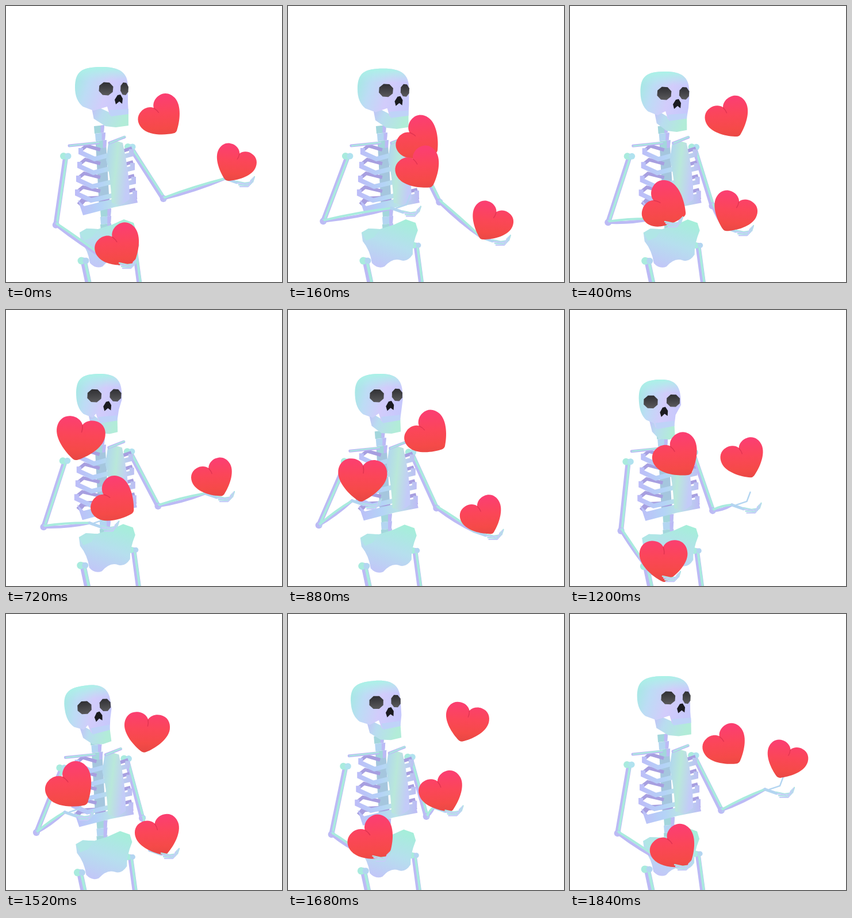
An HTML page that plays this animation: 480x480 px, repeating every 1.92 s.

```html
<!DOCTYPE html>
<html lang="en">
<head>
<meta charset="utf-8">
<title>Juggling skeleton</title>
<style>
html, body { margin: 0; width: 100%; height: 100%; overflow: hidden; background: #fff; }
svg { display: block; width: 100vw; height: 100vh; }
</style>
</head>
<body>
<svg viewBox="0 0 480 480">
  <defs>
    <linearGradient id="skull" x1="0" y1=".3" x2="1" y2=".6">
      <stop offset="0" stop-color="#a6e8e4"/><stop offset=".25" stop-color="#bddcf5"/>
      <stop offset=".6" stop-color="#d2ccfb"/><stop offset="1" stop-color="#c6c8fc"/>
    </linearGradient>
    <linearGradient id="crown" x1="0" y1="0" x2="0" y2="1">
      <stop offset="0" stop-color="#a9f3e6"/><stop offset=".3" stop-color="#b4ecec" stop-opacity="0"/>
    </linearGradient>
    <linearGradient id="jaw" x1="0" y1="0" x2="1" y2=".3">
      <stop offset="0" stop-color="#c3bdf8"/><stop offset=".4" stop-color="#b9dcf0"/><stop offset="1" stop-color="#b2ecd8"/>
    </linearGradient>
    <linearGradient id="sternum" x2="1" y2=".3">
      <stop offset="0" stop-color="#b0d3f2"/><stop offset=".5" stop-color="#b9e8da"/><stop offset="1" stop-color="#c3cbf8"/>
    </linearGradient>
    <linearGradient id="rib" gradientUnits="userSpaceOnUse" x1="122" y1="0" x2="230" y2="0">
      <stop offset="0" stop-color="#bdbdf8"/><stop offset=".4" stop-color="#b4d3f7"/>
      <stop offset=".65" stop-color="#b9e3e6"/><stop offset="1" stop-color="#bdb9f6"/>
    </linearGradient>
    <linearGradient id="pelvis" x1=".7" y1="0" x2=".3" y2="1">
      <stop offset="0" stop-color="#a6eeda"/><stop offset=".5" stop-color="#b6dfee"/><stop offset="1" stop-color="#c2c6f8"/>
    </linearGradient>
    <linearGradient id="socket" x1="0" y1="0" x2="0" y2="1">
      <stop offset="0" stop-color="#2f2f33"/><stop offset="1" stop-color="#5a5a5c"/>
    </linearGradient>
    <linearGradient id="heart">
      <stop offset="0" stop-color="#fb3f70"/><stop offset=".4" stop-color="#fb4658"/>
      <stop offset=".75" stop-color="#f54a48"/><stop offset="1" stop-color="#e64743"/>
    </linearGradient>
  </defs>
  <g id="scene"></g>
</svg>
<script>
const LOOP = 1920, STEP = 80, BEAT = LOOP / 3, GRAVITY = 0.0018;
const MINT = '#a9ebde', LILAC = '#bcbaf5', SHADE = '#a79fe0', SKY = '#b3d5f1';
const scene = document.getElementById('scene');

const wrap = t => ((t % LOOP) + LOOP) % LOOP;
const wave = (t, period) => Math.cos(2 * Math.PI * t / period);
const mix = (a, b, u) => a.map((v, i) => v + (b[i] - v) * u);
const ease = u => u * u * (3 - 2 * u);

// Key times shared by the hearts and the head.
const times = [0, 400, 720, 1040, 1200, 1520, 1840];
function segment(t) {
  const i = times.findLastIndex(k => k <= t), next = (i + 1) % times.length;
  const start = times[i], end = times[i + 1] ?? LOOP;
  return { i, next, start, end, u: (t - start) / (end - start) };
}

// tilt: mean, swing, time of its peak. Hearts follow each other one beat apart.
const hearts = [
  { tilt: [-42, 24, 1440], path: [[272, 194], [167, 348], [190, 333], [300, 177], [303, 260], [266, 386], [273, 231]] },
  { tilt: [14, 16, 200], path: [[397, 275], [284, 360], [128, 224], [130, 373], [163, 436], [244, 206], [375, 255]] },
  { tilt: [-34, 7, 640], path: [[199, 420], [277, 196], [362, 294], [317, 343], [188, 256], [115, 302], [184, 409]] }
];
const thrownAt = i => 680 + BEAT * i;

// Arcs bend upwards in the air and downwards in a hand.
function heartAt(index, time) {
  const t = wrap(time), { i, next, start, end, u } = segment(t), { path } = hearts[index];
  const [x, y] = mix(path[i], path[next], u);
  const lift = wave((start + end) / 2 - thrownAt(index) - 290, LOOP / 2);
  return [x, y - lift * GRAVITY * (t - start) * (end - t)];
}

// Fingertips stay with the held heart, then travel to the next catch.
function handAt(t, { caught, hold, reach }) {
  const sinceCatch = i => wrap(t - thrownAt(i) - caught);
  const i = hearts.findIndex((_, k) => sinceCatch(k) < BEAT);
  const since = sinceCatch(i), free = since - hold;
  const [x, y] = free < 0 ? heartAt(i, t)
    : mix(heartAt(i, t - free), heartAt((i + 1) % 3, t + BEAT - since), free / (BEAT - hold));
  return [x + reach[0], y + reach[1]];
}

// elbow: how far the elbow stands from the shoulder for a given hand.
const nearArm = {
  caught: 1500, hold: 380, reach: [30, 24], shoulder: [104, 261], upper: 121,
  elbow: (x, y) => (y - 370) * .28 - 38
};
const farArm = {
  caught: 580, hold: 440, reach: [36, 27], shoulder: [216, 245], upper: 107,
  elbow: x => (x - 330) * .23 + 34
};

// Centre x, top, turn to the side.
const headPath = [[166, 106, 30], [165, 114, 21], [162, 111, 14], [155, 111, 23], [157, 121, 6], [144, 124, 16], [163, 108, 30]];

const shape = (d, fill) => `<path d="${d}" fill="${fill}"/>`;
const stroke = (d, color, width, cap = 'butt') =>
  `<path d="${d}" fill="none" stroke="${color}" stroke-width="${width}" stroke-linecap="${cap}" stroke-linejoin="${cap === 'round' ? 'round' : 'miter'}"/>`;
const line = (d, color, width) => stroke(d, color, width, 'round');
const dot = (x, y, r, fill) => `<circle cx="${x}" cy="${y}" r="${r}" fill="${fill}"/>`;
const group = (transform, content) => `<g transform="${transform}">${content}</g>`;
const bone = (x1, y1, x2, y2, w) =>
  line(`M${x1},${y1}L${x2},${y2}`, LILAC, w) + line(`M${x1 + w / 5},${y1}L${x2 + w / 5},${y2 - w / 5}`, MINT, w * .45);

function vertebrae(x, y, count, w, lean) {
  let s = '';
  for (let i = 0; i < count; i++) {
    const left = x + i * lean, top = y + i * 13;
    s += shape(`M${left},${top}l${w},-2l-1,13l${2 - w},2Z`, i % 2 ? SKY : '#a3d6dc');
    s += shape(`M${left + w * .65},${top - 1}l${w * .35},-1l-1,13l${-w * .3},1Z`, LILAC);
  }
  return s;
}

function torso() {
  let back = shape('M156,240L174,238L180,345L162,350Z', '#a5c6de') + vertebrae(153, 209, 3, 18, 2), front = '';
  for (let i = 0; i < 4; i++) {
    const x = 130 - 2 * i, y = 252 + 24 * i, right = 219 + 2 * i;
    back += stroke(`M${x},${y - 1}l10,-8L164,${y - 2}M201,${y + 1}L${right},${y - 5}`, SHADE, 6);
    front += stroke(`M${x},${y - 5}v8l24,11L184,${y + 6}M203,${y + 10}L${right - 1},${y + 6}v-9`, 'url(#rib)', 8);
  }
  back += stroke('M127,346L136,336L180,334M200,340L227,331', SHADE, 9);
  return back + front +
    shape('M125,337L136,348L184,336L226,329L229,342L188,350L134,364Z', 'url(#rib)') +
    shape('M178,239L190,234L203,238Q215,290 215,336L200,347L184,342Q181,290 174,268Z', 'url(#sternum)') +
    bone(110, 243, 160, 238, 5) + bone(180, 238, 206, 228, 5);
}

const thigh = (x, y, w) => bone(x, y, x + 10, 490, w) + dot(x - 4, y, w / 2 + 1, MINT) + dot(x + 4, y, w / 2, SKY);
const hips = () => vertebrae(164, 354, 3, 19, 0) + thigh(135, 443, 11) + thigh(223, 416, 9) +
  shape('M128,394L140,387L160,388L185,380L205,371L222,377L226,390Q216,415 217,432Q208,446 196,442Q182,437 168,453' +
    'Q156,458 146,447Q143,425 130,409Z', 'url(#pelvis)') +
  shape('M128,394L140,387L160,388L150,402L136,408Z', '#b0e6e6');

function arm({ shoulder: [sx, sy], upper, elbow }, [x, y], [bx, by]) {
  const dx = elbow(x, y), ex = sx + bx + dx, ey = sy + by + Math.sqrt(upper ** 2 - dx ** 2);
  const wx = x - 52, wy = y - 2, mx = (ex + wx) / 2, my = (ey + wy) / 2;
  return bone(sx + bx, sy + by, ex, ey, 9) + dot(sx + bx - 4, sy + by, 6, MINT) + dot(sx + bx + 4, sy + by, 5.5, '#b0e2ef') +
    dot(ex, ey, 6, LILAC) + dot(ex + 2, ey - 1, 4, SKY) +
    line(`M${ex},${ey}Q${mx},${my + 5} ${wx},${wy}`, LILAC, 5) +
    line(`M${ex + 2},${ey - 2}Q${mx},${my - 4} ${wx},${wy}`, MINT, 4) +
    line(`M${wx},${wy}L${x - 32},${y + 5}`, SKY, 5) + line(`M${wx + 8},${wy}l18,-6l6,-16`, SKY, 2.5);
}

function fingers([x, y]) {
  let s = '';
  for (let i = 0; i < 4; i++) {
    s += line(`M${x - 32 + 2 * i},${y + 3 + 3 * i}l14,${3 - i}l${14 - 4 * i},-2l3,-9`, i % 2 ? '#c5cdf8' : '#b0e2e6', 2.4);
  }
  return s;
}

function socket(cx, cy, rx, ry) {
  let d = '';
  for (let k = 0; k < 8; k++) {
    const a = (k + .6) * Math.PI / 4;
    d += `${k ? 'L' : 'M'}${cx + rx * 1.05 * Math.cos(a)},${cy + ry * Math.sin(a)}`;
  }
  return shape(d + 'Z', 'url(#socket)');
}

function head([cx, top, turn], tilt) {
  const h = 34 + turn * .4, back = turn * .12 - 22, chin = turn + 17, cheek = Math.min(h, turn + 20);
  const shell = `M${-h},36C${-h},8 ${-h * .75},0 0,0C${h * .7},0 ${h},10 ${h},34L${h},46L${cheek},63` +
    `L${chin},80L${turn - 16},83L${turn - 20},69L${-h * .3},76L${-h * .7},69Q${-h},58 ${-h},36Z`;
  return group(`translate(${cx},${top}) rotate(${tilt} 0 50)`,
    shape(`M${back},64L${turn - 14},80L${chin},80L${chin},102L${turn * .5 + 10},105L${turn * .5 - 8},103L${back + 5},90Z`, 'url(#jaw)') +
    shape(shell, 'url(#skull)') + shape(shell, 'url(#crown)') +
    shape(`M${turn - 16},75L${chin},73V82L${turn - 14},86Z`, '#bfd3f8') +
    socket(turn - 22, 38, 12.5, 12) + socket(turn * .7 + 19, 38, 13 - turn * .2, 11.5) +
    shape(`M${turn - 7},57l5,-8l5,-1l4,7l-1,9l-5,-4l-6,5Z`, '#1b1b20'));
}

const heartOutline = 'M0,-25C-4,-33-14,-37-22,-36C-36,-35-43,-24-43,-12C-43,8-20,28-4,37Q0,39 4,37' +
  'C20,28 43,8 43,-12C43,-24 36,-35 22,-36C14,-37 4,-33 0,-25Z';

function heart(index, t) {
  const [x, y] = heartAt(index, t), [mean, swing, peak] = hearts[index].tilt;
  const tilt = mean + swing * wave(t - peak, LOOP), size = 1.07 - x * .0006;
  const light = `<linearGradient id="light${index}" href="#heart" gradientTransform="rotate(${90 - tilt} .5 .5)"/>`;
  return light + group(`translate(${x},${y}) rotate(${tilt}) scale(${size})`,
    shape(heartOutline, `url(#light${index})`) + line('M0,-24Q2,-17 1,-12', '#e03450', 1.5));
}

function draw(t) {
  const { i, next, u } = segment(t), pose = mix(headPath[i], headPath[next], ease(u));
  const lean = pose[0] - 166, shift = [lean * .3, -lean * .3];
  const near = handAt(t, nearArm), far = handAt(t, farArm);
  scene.innerHTML = arm(farArm, far, shift) + group(`translate(${shift})`, hips() + torso()) +
    head(pose, lean / 3) + arm(nearArm, near, shift) +
    hearts.map((_, k) => heart(k, t)).join('') + fingers(far) + fingers(near);
}

const start = performance.now();
let shown = -1;
function tick() {
  const step = Math.floor((performance.now() - start) % LOOP / STEP);
  if (step !== shown) draw((shown = step) * STEP);
  requestAnimationFrame(tick);
}
tick();
</script>
</body>
</html>
```
